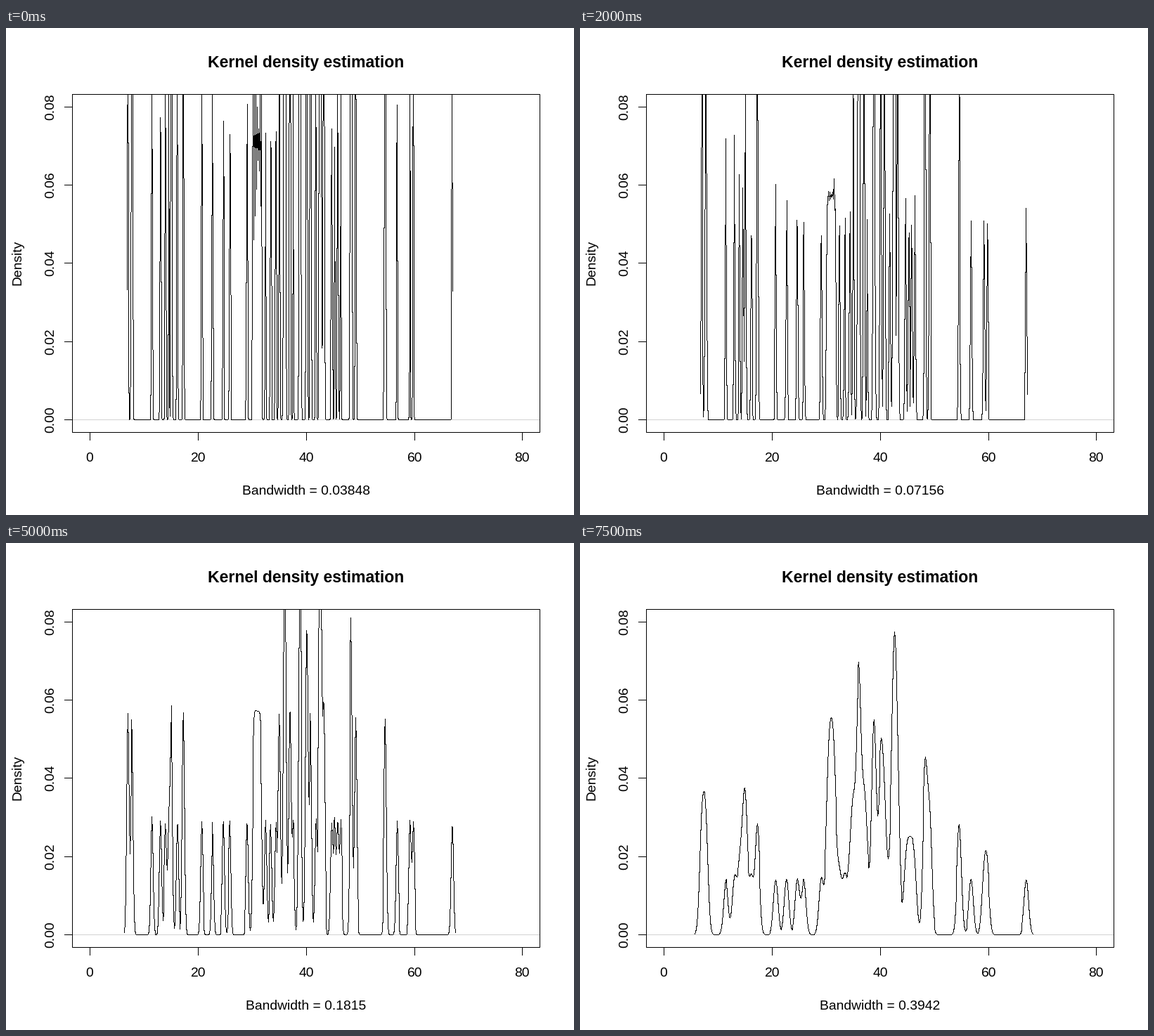
Animation of 808 by 693 pixels, one loop 8000 ms. Source, as a matplotlib script:

```python
import numpy as np
import matplotlib.pyplot as plt
from matplotlib.animation import FuncAnimation

W, H, DPI = 808, 693, 64
FRAMES, INTERVAL = 16, 500
PX = 72 / DPI  # points per pixel

# Margins of 5.1, 4.1, 4.1 and 2.1 text lines
LINE = 23.04
LEFT, RIGHT = 4.1 * LINE, W - 2.1 * LINE
TOP, BOTTOM = 4.1 * LINE, H - 5.1 * LINE

plt.rcParams["font.family"] = "Liberation Sans"
plt.rcParams["text.hinting"] = "native"
plt.rcParams["path.simplify"] = False

# Centres of tight clusters by size, and evenly spaced runs (start, stop, count)
CLUSTERS = {1: [14],
            2: [7.05, 7.8, 15.1, 17.3, 35.05, 37, 40.8, 43.25, 49.15, 54.6],
            3: [40.1, 48.3], 4: [38.85], 5: [36.05, 42.6]}
RUNS = [(11.5, 16.2, 4), (20.7, 24.7, 3), (25.9, 29.1, 2), (30.2, 31.7, 7),
        (32.5, 34.4, 3), (37.6, 41.8, 2), (44.7, 46.4, 4), (56.8, 59.2, 2),
        (59.8, 67, 2)]


def make_sample():
    tight = [c + 0.1 * (np.arange(n) - (n - 1) / 2)
             for n, centres in CLUSTERS.items() for c in centres]
    return np.concatenate(tight + [np.linspace(*run) for run in RUNS])


SAMPLE = make_sample()


def bandwidth(i):
    return 0.03847892 * np.exp(0.15512 * i)


def density(x, bw, n=512):
    """Gaussian density estimate: linear binning, then FFT convolution."""
    start, end = x.min() - 3 * bw, x.max() + 3 * bw
    lo, up = start - 4 * bw, end + 4 * bw
    pos = (x - lo) / (up - lo) * (n - 1)
    cell = np.floor(pos).astype(int)
    frac = pos - cell
    mass = np.zeros(2 * n)
    np.add.at(mass, cell, (1 - frac) / len(x))
    np.add.at(mass, cell + 1, frac / len(x))

    lag = np.linspace(0, 2 * (up - lo), 2 * n)
    lag[n + 1:] = -lag[n - 1:0:-1]
    kernel = np.exp(-0.5 * (lag / bw) ** 2) / (bw * np.sqrt(2 * np.pi))
    conv = np.fft.ifft(np.fft.fft(mass) * np.conj(np.fft.fft(kernel)))
    dens = np.maximum(0, conv.real[:n])
    grid = np.linspace(start, end, n)
    return grid, np.interp(grid, np.linspace(lo, up, n), dens)


def to_x(v):
    """Pixel column; the range 0..80 is padded by 4 %."""
    return np.floor(LEFT + (np.asarray(v) + 3.2) / 86.4 * (RIGHT - LEFT))


def to_y(v):
    """Pixel row; the range 0..0.08 is padded by 4 %."""
    return np.floor(BOTTOM - (np.asarray(v) + 0.0032) / 0.0864 * (BOTTOM - TOP))


def crisp(x, y):
    """Turn a dense polyline on whole pixels into one-pixel-wide column bars."""
    mid = (y[:-1] + y[1:]) / 2
    ends = np.array([np.r_[y[0], mid], y, np.r_[mid, y[-1]]])
    top = np.ceil(ends.min(axis=0))
    bottom = np.floor(ends.max(axis=0)) + 1
    top, bottom = np.clip([top, bottom], y0, y1)
    bars = np.column_stack([top, bottom, np.full(len(y), np.nan)])
    return np.repeat(x + 0.5, 3), bars.ravel()


fig = plt.figure(figsize=(W / DPI, H / DPI), dpi=DPI, facecolor="white")
ax = fig.add_axes([0, 0, 1, 1])
ax.set_xlim(0, W)
ax.set_ylim(H, 0)
ax.axis("off")


def stroke(xs, ys, color="black", z=2, cap="projecting"):
    line, = ax.plot(np.add(xs, 0.5), np.add(ys, 0.5), color=color, lw=PX,
                    snap=False, solid_capstyle=cap, solid_joinstyle="miter",
                    zorder=z)
    return line


def label(x, y, s, size=19.3, **kw):
    return ax.text(x, y, s, fontsize=size * PX, ha="center", va="baseline",
                   rotation_mode="anchor", **kw)


x0, x1, y0, y1 = np.floor([LEFT, RIGHT, TOP, BOTTOM])

stroke([x0, x1], [to_y(0)] * 2, color="#d3d3d3", z=1)
curve = stroke([], [], cap="butt")
stroke([x0, x1, x1, x0, x0], [y0, y0, y1, y1, y0], z=3)

for v in range(0, 81, 20):
    x = to_x(v)
    stroke([x, x], [y1, y1 + 11])
    label(x, 617, str(v))
for k in range(5):
    y = to_y(k * 0.02)
    stroke([x0 - 11, x0], [y, y])
    label(68, y, f"{k * 0.02:.2f}", rotation=90)

label(427, 56, "Kernel density estimation", size=23, weight="bold")
label(21, 334, "Density", rotation=90)
caption = label(427, 664, "")


def update(i):
    bw = bandwidth(i)
    xs, ys = density(SAMPLE, bw)
    curve.set_data(*crisp(to_x(xs), to_y(ys)))
    caption.set_text(f"Bandwidth = {bw:.4g}")
    return curve, caption


anim = FuncAnimation(fig, update, frames=FRAMES, interval=INTERVAL,
                     repeat=True, repeat_delay=0)
plt.show()
```
